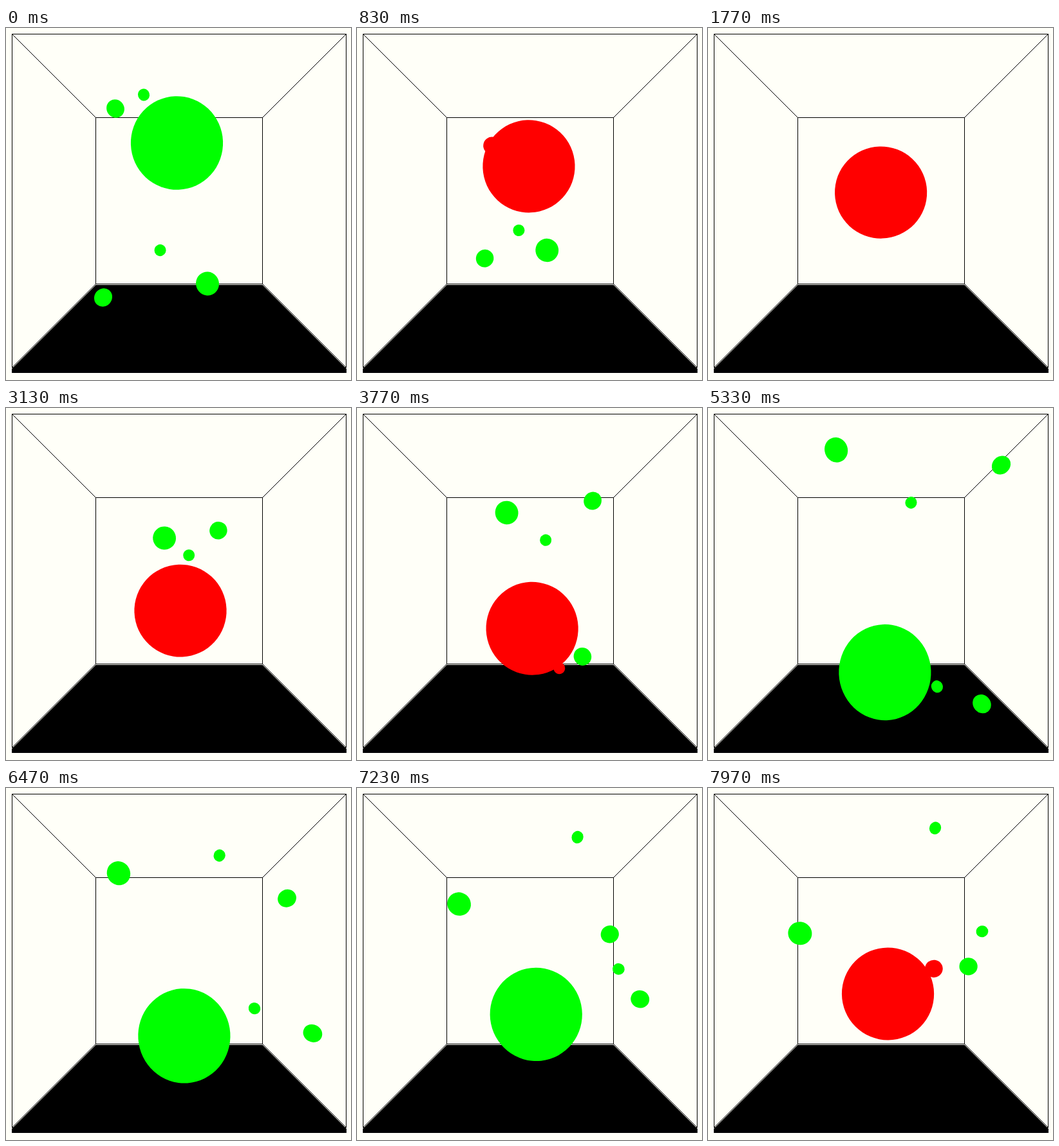
Recreate the animation shown at these times as an HTML page with a canvas. Size 536 by 548 pixels, loop 8 s.

```html
<!DOCTYPE html>
<html lang="en">
<head>
<meta charset="utf-8">
<title>Balls in a box</title>
<style>
  html, body { margin: 0; width: 100%; height: 100%; overflow: hidden; background: #fffff8; }
  canvas { display: block; }
</style>
</head>
<body>
<canvas id="stage" width="536" height="548"></canvas>
<script>
const ctx = document.getElementById('stage').getContext('2d');
const LOOP = 8000, FPS = 30;
const MID = 269;      // vanishing point, both axes
const FOCAL = 480;    // camera distance in pixels

// r: radius, x/y: start, vx/vy: pixels per second, reach: bounce distance from MID
const balls = [
  { r: 71.6, x: 265.5, y: 179,   vx: 1.76,   vy: 43.6,  reach: 154.4 },
  { r: 17.9, x: 313,   y: 398,   vx: -21.35, vy: -62.4, reach: 205.4 },
  { r: 13.6, x: 151,   y: 419.5, vx: 57.1,   vy: -73,   reach: 209.4 },
  { r: 13.6, x: 170,   y: 125.5, vx: 47.9,   vy: 69.4,  reach: 209.1 },
  { r: 9,    x: 214,   y: 104,   vx: 26.6,   vy: 79.9,  reach: 212.9 },
  { r: 9,    x: 239.5, y: 346,   vx: 14.25,  vy: -37.25, reach: 213.2 }
];

// Position relative to MID, folded back at the walls
function bounce(start, speed, reach, t) {
  const p = start + speed * t - MID;
  if (p > reach) return 2 * reach - p;
  if (p < -reach) return -2 * reach - p;
  return p;
}

function place(ball, t) {
  const dx = bounce(ball.x, ball.vx, ball.reach, t);
  const dy = bounce(ball.y, ball.vy, ball.reach, t);
  // Undo the perspective magnification to get the sphere's own centre and size
  const q = 1 + (ball.r / FOCAL) ** 2;
  return { r: ball.r, dx, dy, cx: dx / q, cy: dy / q, cr: ball.r / Math.sqrt(q) };
}

function touching(a, b) {
  return a !== b && Math.hypot(a.cx - b.cx, a.cy - b.cy) < a.cr + b.cr;
}

// A sphere away from the middle projects to an ellipse stretched outwards
function drawBall(s, color) {
  const stretch = Math.hypot(1, Math.hypot(s.dx, s.dy) / FOCAL);
  ctx.fillStyle = color;
  ctx.beginPath();
  ctx.ellipse(MID + s.dx, MID + s.dy, s.r * stretch, s.r, Math.atan2(s.dy, s.dx), 0, 2 * Math.PI);
  ctx.fill();
}

function drawRoom() {
  ctx.fillStyle = '#fffff8';
  ctx.fillRect(0, 0, 536, 548);
  ctx.fillStyle = '#000';
  for (let y = 400; y < 537; y++) {
    const inset = Math.max(0, 530 - y);
    ctx.fillRect(9 + inset, y, 520 - 2 * inset, 1);
  }
  ctx.strokeStyle = '#000';
  ctx.lineWidth = 1;
  ctx.strokeRect(9.5, 9.5, 519, 519);
  ctx.strokeRect(139.5, 139.5, 259, 259);
  for (let i = 9; i <= 139; i++) {
    for (const x of [i, 537 - i]) {
      ctx.fillRect(x, i, 1, 1);
      ctx.fillRect(x, 537 - i, 1, 1);
    }
  }
}

function draw(ms) {
  // Steps of 1/30 s, shown on a 10 ms clock
  const step = Math.floor((Math.floor(ms / 10) * 10 + 3.4) * FPS / 1000);
  const spheres = balls.map(b => place(b, step / FPS));
  drawRoom();
  for (const s of spheres) {
    drawBall(s, spheres.some(o => touching(s, o)) ? '#f00' : '#0f0');
  }
}

const begin = performance.now();
function tick() {
  draw((performance.now() - begin) % LOOP);
  requestAnimationFrame(tick);
}
tick();
</script>
</body>
</html>
```
